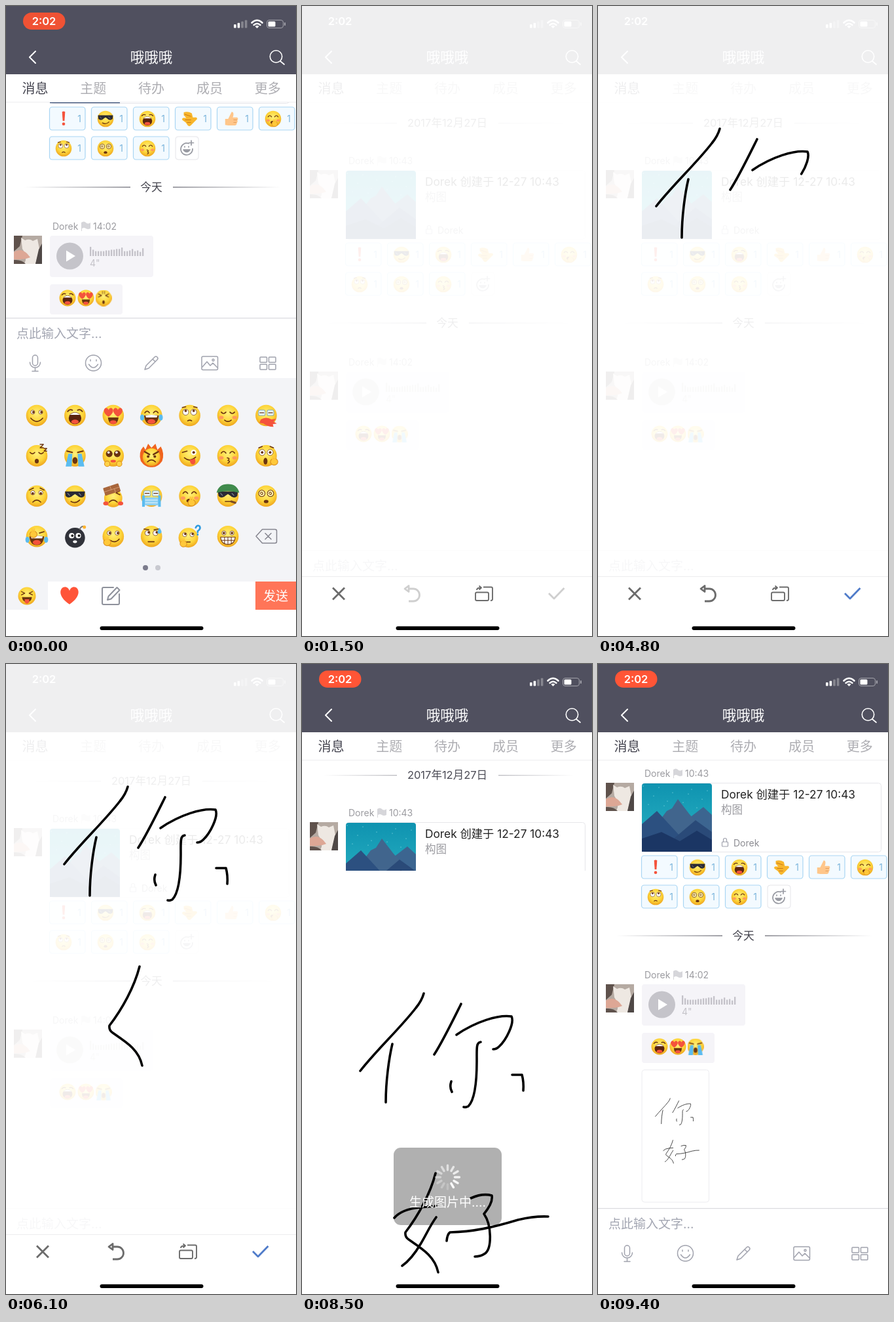
Recreate the animation shown at these times as an HTML page. Size 443 px wide and 960 px high, loop 9.5 s.

```html
<!DOCTYPE html>
<html lang="zh-CN">
<head>
<meta charset="utf-8">
<title>手写消息</title>
<style>
html, body { margin: 0; width: 100%; height: 100%; overflow: hidden; background: #fff; }
svg { display: block; width: 100vw; height: 100vh; }
text { font-family: Inter, "Noto Sans CJK SC", "Noto Sans CJK", sans-serif; white-space: pre; }
.icon { fill: none; stroke: #a0a2ad; stroke-width: 1.5; stroke-linecap: round; stroke-linejoin: round; }
.tool { fill: none; stroke: #6c6c6c; stroke-width: 2.8; stroke-linejoin: round; }
.ink { fill: none; stroke: #000; stroke-width: 3.6; stroke-linecap: round; stroke-linejoin: round; }
.ink path { stroke-dasharray: 1 2; }
.thumb { fill: none; stroke: #333; stroke-width: 3.8; stroke-linecap: round; stroke-linejoin: round; }
#spin { transform-origin: 222.5px 467px; animation: spin 1s steps(12) infinite; }
@keyframes spin { to { transform: rotate(360deg); } }
</style>
</head>
<body>
<svg id="stage" viewBox="0 0 443 960" preserveAspectRatio="none"></svg>
<script>
const LOOP = 9500, NAME = 'Dorek';
const BROWN = '#6b3410', RED = '#f4533c', BLUE = '#5bbcf0';

// shape helpers
const text = (x, y, size, fill, str, anchor = 'start', weight = 400) =>
  `<text x="${x}" y="${y + size * .37}" font-size="${size}" fill="${fill}" text-anchor="${anchor}" font-weight="${weight}">${str}</text>`;
const rect = (x, y, w, h, fill, r = 0, extra = '') =>
  `<rect x="${x}" y="${y}" width="${w}" height="${h}" rx="${r}" fill="${fill}" ${extra}/>`;
const oval = (x, y, rx, ry, fill, extra = '') =>
  `<ellipse cx="${x}" cy="${y}" rx="${rx}" ry="${ry}" fill="${fill}" ${extra}/>`;
const dot = (x, y, r, fill, extra) => oval(x, y, r, r, fill, extra);
const fill = (d, color) => `<path d="${d}" fill="${color}"/>`;
const line = (d, w = 1.6, color = BROWN) =>
  `<path d="${d}" fill="none" stroke="${color}" stroke-width="${w}" stroke-linecap="round" stroke-linejoin="round"/>`;
const at = (x, y, k, body) => `<g transform="translate(${x} ${y}) scale(${k})">${body}</g>`;
const pair = f => f(-1) + f(1);

// emoji parts, drawn around a face of radius 16
const heartPath = 'M0 6C-9 0 -6 -6 -2.6 -5.5Q-.6 -5 0 -3Q.6 -5 2.6 -5.5C6 -6 9 0 0 6Z';
const face = dot(0, 0, 16, 'url(#skin)');
const eyes = (dx = 0, dy = 0, r = 3.8) => pair(s => dot(s * 6, -5, r, '#fff', `stroke="${BROWN}" stroke-width=".7"`) + dot(s * 6 + dx, -5 + dy, 1.9, BROWN));
const arcs = line('M-10 -4Q-6.5 -9 -3 -4M3 -4Q6.5 -9 10 -4');
const shut = line('M-10 -5Q-6.5 -1 -3 -5M3 -5Q6.5 -1 10 -5');
const squint = line('M-10 -8L-4 -5L-10 -2M10 -8L4 -5L10 -2');
const bigMouth = fill('M-11 0Q0 -2 11 0Q10 13 0 13Q-10 13 -11 0', BROWN) + oval(0, 9, 6, 3.5, RED) + fill('M-9 0Q0 -2 9 0L8 3H-8Z', '#fff');
const roundMouth = oval(0, 4, 9.5, 9, '#5a2410') + oval(0, 9.3, 5.5, 3.2, RED) + fill('M-8 -1Q0 -8 8 -1Z', '#fff');
const blush = pair(s => oval(s * 10, 3, 3.5, 2.5, '#ff9a5a'));
const frown = line('M-6 9Q0 3 6 9');
const shades = fill('M-15 -7H15L14 0Q9 5 3 -1L0 -3L-3 -1Q-9 5 -14 0Z', '#2a2a34') + line('M-11 -4l3 3M6 -4l3 3', 1, '#8890a0');
const palm = (x, y) => oval(x, y, 5.5, 5, '#ffc83a', 'stroke="#d98a1c"') + line(`M${x - 2} ${y - 4}v-4M${x + 1} ${y - 4}v-4`, 2.4, '#ffc83a');
const rings = pair(s => dot(s * 6.5, -4, 4.8, '#fff3b0', `stroke="${BROWN}"`) + line(`M${s * 6.5 - 2.5} -4q2.5 -4 4 0q-1 3 -3 1`, 1));
const tears = pair(s => fill(`M${s * 10} -3L${s * 4} -3L${s * 5} 16H${s * 14}Z`, BLUE));
const specs = pair(s => rect(s * 6.5 - 5, -8, 10, 8, '#e8f6ff', 2, 'stroke="#8aa" stroke-width="1"') + line(`M${s * 6.5 - 3} -4h6`, 1.2));

const emoji = {
  smile: face + eyes(1, 0, 3) + line('M-9 4Q0 14 9 4'),
  laugh: face + line('M-11 -6Q-8 -10 -4 -8M11 -6Q8 -10 4 -8', 1.8) + roundMouth,
  love: face + pair(s => at(s * 7, -5, 1.15, fill(heartPath, RED))) + fill('M-8 3H8Q7 13 0 13Q-7 13 -8 3', BROWN) + oval(0, 10, 5, 3, RED),
  joy: face + arcs + bigMouth + pair(s => oval(s * 14, 3, 3, 4.5, BLUE)),
  roll: face + eyes(0, -2, 4.5) + line('M-11 -12l5 -1M6 -13l5 1') + line('M-3 8Q0 6 3 8'),
  shy: face + shut + blush + line('M-5 7Q0 11 5 7'),
  palmRed: face + specs + fill('M-8 6Q0 1 8 6L15 5L11 9L16 12L10 13L11 17Q2 17 -4 12L-10 11Z', RED),
  sleep: face + shut + oval(0, 8, 3, 3.5, BROWN) + line('M5 -17h5l-5 5h5M11 -11h4l-4 4h4', 1.4),
  sob: face + tears + line('M-12 -7L-4 -5M12 -7L4 -5', 2) + oval(0, 7, 3.8, 5, BROWN),
  huff: face + squint + line('M-2 -13v5M2 -13v5', 1) + oval(0, 8, 2.5, 3.5, BROWN),
  plead: face + pair(s => dot(s * 6, -3, 5, BROWN) + dot(s * 6 - 1, -5, 1.8, '#fff')) + oval(0, 8, 4, 2, RED) + pair(s => oval(s * 9, 12, 4, 4, '#ffd24a', 'stroke="#d98a1c"')),
  rage: fill('M-16 8Q-20 -6 -12 -14L-9 -9L-5 -18L0 -12L6 -18L9 -9L14 -14Q20 -4 16 8Q9 18 0 17Q-9 18 -16 8', '#f0641e') + at(0, 2, .82, face) + line('M-10 -6L-3 -2M10 -6L3 -2', 2.4) + dot(-5, 1, 2, BROWN) + dot(5, 1, 2, BROWN) + frown,
  wink: face + line('M-11 -5l7 -2') + dot(6, -5, 4, '#fff') + dot(6, -5, 2, BROWN) + line('M-8 3Q0 10 9 2') + fill('M0 6L8 4Q10 13 5 13Q1 13 0 6', RED),
  kiss: face + arcs + line('M-1 3q5 1 1 4q5 1 0 4') + blush,
  shock: face + eyes(0, 0, 4.5) + line('M-11 -12l5 -2M6 -14l5 2') + oval(-1, 8, 3, 5, BROWN) + palm(12, 9),
  sad: face + eyes(0, 1, 3.2) + line('M-11 -9l6 -3M11 -9l-6 -3') + frown,
  cool: face + shades + line('M-6 8Q1 12 7 6'),
  brick: at(0, 3, .85, face) + squint + frown + `<g transform="rotate(-18)">${rect(-11, -16, 24, 12, '#a8663c', 1)}${line('M-11 -10h24M0 -16v6M5 -10v6', .8, '#d8a078')}</g>` + pair(s => oval(s * 11, 11, 4, 3, RED)),
  mask: face + specs + rect(-11, 2, 22, 12, '#8fd0f2', 3) + line('M-9 6H9M-9 10H9', .8, '#fff') + pair(s => rect(s * 12 - 2, -1, 4, 17, BLUE)),
  giggle: face + arcs + blush + oval(0, 7, 5, 3, BROWN) + palm(3, 10),
  army: face + shades + fill('M-17 -5Q-14 -18 0 -18Q14 -18 17 -5Q0 -10 -17 -5', '#3f8a4c') + line('M-4 8H5') + line('M5 8l6 2', 3, '#7a4a24'),
  dizzy: face + rings + oval(0, 8, 3.5, 2.5, BROWN),
  facepalm: face + line('M4 -5l7 -2') + bigMouth + palm(-5, -3) + pair(s => oval(s * 14, 5, 3, 4.5, BLUE)),
  bomb: dot(0, 2, 15, '#30323a') + pair(s => dot(s * 5, -1, 4, '#fff') + dot(s * 5 + 1, -1, 1.8, '#111')) + oval(0, 8, 3, 2, '#fff') + line('M7 -11q4 -6 7 -3', 2, '#777') + dot(14, -14, 2.5, '#ffb32e'),
  chin: face + eyes(1, 0, 3.2) + line('M-4 6Q3 11 9 4') + palm(-9, 9),
  sweat: face + eyes(2, -1) + line('M-11 -11l7 1M4 -10l7 -1') + line('M-5 8h9') + fill('M12 -13q6 8 0 9q-6 -1 0 -9', BLUE),
  think: at(-2, 2, .92, face + eyes(1, -1, 3.4) + line('M-4 7h7') + palm(-8, 10)) + line('M9 -13q2 -5 6 -2q2 4 -3 7v2M12 -3v.5', 2.6, '#2f9be0'),
  grin: face + eyes(0, 0, 3.2) + fill('M-11 1H11Q10 12 0 12Q-10 12 -11 1', '#fff') + line('M-11 1H11Q10 12 0 12Q-10 12 -11 1ZM-10 6H10M-5 1v10M0 1v11M5 1v10', 1),
  tongue: face + squint + fill('M-9 2H9Q8 11 0 11Q-8 11 -9 2', BROWN) + fill('M-4 6H4V11Q0 17 -4 11Z', RED),
  bang: fill('M-3 -14Q0 -16 3 -14L1.8 4H-1.8Z', RED) + dot(0, 10, 3, RED),
  down: fill('M-11 -13Q-3 -16 5 -11L7 -3H14Q17 0 14 2L3 13Q0 16 -3 13L-7 7L-13 3Q-16 0 -12 -2H-6L-11 -7Z', '#f8b62c') + line('M-9 -9L3 -5M-8 2H3M-4 7H3', 1.3, '#c9791a'),
  thumb: fill('M-12 0H-6L1 -14Q6 -14 4 -5L3 -3H12Q15 0 12 3Q14 6 11 8Q12 11 8 13H-6L-12 12Z', '#ffc68a') + line('M5 2h6M5 7h5', 1, '#d98f4c')
};
const em = (name, x, y, r) => at(x, y, r / 16, emoji[name]);

// handwriting: path, start ms, end ms
const strokes = [
  ['M186 187Q183 198 174 209C150 240 115 272 89 305', 3560, 3810],
  ['M138 264C133 285 128 320 128 353', 3920, 4120],
  ['M243 203C232 225 215 260 202 280', 4250, 4450],
  ['M236 250C265 230 300 219 320 222C325 232 312 258 301 268Q297 272 292 272', 4560, 4850],
  ['M273 261C266 262 267 270 267 290C267 325 263 350 254 359Q250 361 247 360', 4920, 5160],
  ['M228 321Q225 330 229 337', 5220, 5300],
  ['M321 311H336Q339 322 338 335', 5380, 5490],
  ['M204 461C196 492 178 525 158 551Q157 558 163 562C185 577 203 588 208 612', 5760, 6090],
  ['M205 528C196 540 190 554 181 569C171 586 163 595 153 602', 6240, 6400],
  ['M141 529Q152 516 180 513L205 511', 6560, 6700],
  ['M258 499Q276 491 290 495Q292 506 278 523C290 540 290 575 280 583Q273 588 264 588', 6800, 7150],
  ['M221 564Q222 554 226 551C262 550 290 544 330 532Q355 526 376 527', 7230, 7490]
];

// message list, placed for scroll offset 0
const rule = (y, inset, x1, x2, color) =>
  rect(inset, y, x1 - inset, 1.2, `url(#in${color})`) + rect(x2, y, 447 - inset - x2, 1.2, `url(#out${color})`);
const avatar = y => `<svg x="12" y="${y}" width="43" height="43" viewBox="0 0 43 43">` + rect(0, 0, 43, 43, '#b5aaa2') +
  fill('M0 0H13L9 16L0 24Z', '#5f524c') + fill('M11 3L17 7Q24 4 29 8L36 5L39 20L33 43H16Q22 32 13 20Z', '#eee8e2') +
  fill('M0 25Q10 18 20 27L25 33Q14 37 0 36Z', '#dda795') + fill('M0 37Q12 36 18 43H0Z', '#5f524c') + fill('M33 43L38 21L43 12V43Z', '#4f4846');
const sender = (y, time) => text(71, y, 14, '#9b9ba0', NAME) +
  fill(`M115 ${y - 6}q4 -3 7 0t7 0v9q-4 2 -7 0t-6 0v4h-1z`, '#d6d6da') + text(133, y, 14, '#9b9ba0', time) + avatar(y + 14) + '</svg>';
const picture = `<svg x="67" y="251" width="107" height="104" viewBox="0 0 107 104">` + rect(0, 0, 107, 104, 'url(#sky)', 4) +
  Array.from({ length: 14 }, (_, i) => dot(i * 37 % 103 + 2, i * 23 % 41 + 4, .6, '#a8eef0')).join('') +
  fill('M60 62L94 36L107 48V104H60Z', '#3c6590') + fill('M20 66L38 42L46 38L55 24L72 46L96 74V104H20Z', '#41658d') +
  fill('M0 62L23 42L60 82V104H0Z', '#2c5080') + fill('M44 88L82 56L107 74V104H44Z', '#2a4a78') + fill('M0 104V84L30 74L58 88L84 72L107 86V104Z', '#1b3664') + '</svg>';
const chip = (name, i) => {
  const x = 66.5 + i % 6 * 64, y = 361 + Math.floor(i / 6) * 45;
  return rect(x, y, 54.5, 35, '#f3faff', 4, 'stroke="#a9d6f3" stroke-width="1.2"') + em(name, x + 21.5, y + 18, 12.3) + text(x + 45.5, y + 18, 14, '#7eb6dd', '1', 'middle');
};
const lock = `<g class="icon" style="stroke-width:1.2"><rect x="189.5" y="340" width="9" height="7" rx="1"/><path d="M191.5 340v-3a2.5 2.5 0 0 1 5 0v3"/></g>`;
const bars = [...'a644445566779445745385'].slice(0, 21).map((c, i) => {
  const h = 3 + parseInt(c, 16) * 1.1;
  return rect(128 + i * 4, 588 - h, 2.3, h, '#c4c2c9');
}).join('');
const plusFace = `<g class="icon" style="stroke-width:1.7;stroke:#999ba3"><path d="M279 416.5a9 9 0 1 0 6 8M283 412v7M279.5 415.5h7"/><path d="M271 426q5 7 10 0z" fill="#999ba3"/><path d="M273 421v1M279 421v1"/></g>`;

const list = '<g id="list">' +
  rule(178, 32, 145, 300, 'Soft') + text(222, 178, 16.5, '#4b4b55', '2017年12月27日', 'middle') +
  sender(236, '10:43') + rect(67.5, 250.5, 365, 105, '#fff', 4, 'stroke="#e6e6ea"') + picture +
  text(188, 268, 17.3, '#222', NAME + ' 创建于 12-27 10:43') + text(188, 291, 16.5, '#9b9ba0', '构图') +
  lock + text(207, 342, 14, '#8c8c92', NAME) +
  ['bang', 'cool', 'laugh', 'down', 'thumb', 'giggle', 'roll', 'dizzy', 'kiss'].map(chip).join('') +
  rect(259, 406, 35, 35, '#fff', 4, 'stroke="#e4e4e8"') + plusFace +
  rule(482.5, 28, 190, 255, 'Dark') + text(222, 483, 16.7, '#44444e', '今天', 'middle') +
  sender(543, '14:02') + rect(67, 557, 158, 63, '#f5f4f8', 4) + dot(97.5, 588, 20.5, '#c5c4ca') + fill('M92 579.5V596.5L106 588Z', '#fff') +
  bars + text(128, 599, 14, '#c4c3c9', '4"') +
  rect(67, 631, 111, 46, '#f5f4f8', 4) + em('laugh', 94, 652, 12.5) + em('love', 122, 652, 12.5) +
  `<g id="first">${em('huff', 149, 652, 12.5)}</g><g id="second">${em('sob', 149, 652, 12.5)}</g>` +
  '<g id="sent">' + rect(67, 687.5, 102.5, 201.5, '#fff', 4, 'stroke="#ececf0"') +
  `<g class="thumb" transform="translate(67 687.5) scale(.2325)">${strokes.map(s => `<path d="${s[0]}"/>`).join('')}</g></g></g>`;

// header and tabs
const wifi = line('M375.5 25.5Q383.5 18 391.5 25.5', 2.6, '#fff') + line('M378.5 29Q383.5 24.5 388.5 29', 2.4, '#fff') + fill('M380.5 31Q383.5 28.5 386.5 31L383.5 34Z', '#fff');
const header = rect(0, 0, 443, 104, '#50505f') + rect(26, 10, 64.5, 26, '#ff5536', 13, 'id="pill"') +
  text(58, 23, 16.5, '#fff', '2:02', 'middle', 600) +
  [0, 1, 2, 3].map(i => rect(348 + i * 5.6, 28 - i * 2.2, 3.6, 5.5 + i * 2.2, i < 2 ? '#fff' : '#86868f', 1)).join('') + wifi +
  rect(398.5, 21.5, 25, 12, 'none', 3.5, 'stroke="#a2a2aa"') + rect(400.5, 23.5, 11, 8, '#fff', 1.5) + rect(425, 25, 2, 5, '#a2a2aa', 1) +
  line('M45 69L36 78L45 87', 2, '#fff') + text(222, 78, 21.5, '#fff', '哦哦哦', 'middle') +
  dot(412.5, 77, 9.2, 'none', 'stroke="#fff" stroke-width="1.6"') + line('M419 84L425 89', 1.7, '#fff') +
  rect(0, 104, 443, 43, '#fff') + rect(0, 146, 443, 1, '#ededf0') +
  ['消息', '主题', '待办', '成员', '更多'].map((s, i) => text(44.5 + i * 88.8, 126, 20, i ? '#adadb2' : '#44444f', s, 'middle', i ? 400 : 500)).join('');

// input bar and emoji keyboard
const input = '<g id="input">' + rect(0, 829, 443, 131, '#fff') + rect(0, 829, 443, 1.2, '#dadade') +
  text(16, 853, 19, '#a3a6b2', '点此输入文字...') + '<g class="icon">' +
  '<rect x="40.5" y="886" width="8" height="16" rx="4"/><path d="M36.5 897a8 8 0 0 0 16 0M44.5 905v5M40 910.5h9"/>' +
  '<circle cx="133.5" cy="898" r="12"/><path d="M126.5 900q7 10 14 0M129 893v2M138 893v2"/>' +
  '<path d="M212 908l2 -6l13 -13q2 -2 4 0t0 4l-13 13zM224 892l4 4"/>' +
  '<rect x="299" y="888" width="24.5" height="20.5" rx="2"/><path d="M300 904l7 -8l5 6l4 -4l7 7"/><circle cx="316.5" cy="893.5" r="1.5"/>' +
  [[388, 889], [401.5, 889], [388, 900], [401.5, 900]].map(([x, y]) => `<rect x="${x}" y="${y}" width="10.5" height="8" rx="1"/>`).join('') + '</g></g>';
const keys = 'smile laugh love joy roll shy palmRed sleep sob plead rage wink kiss shock sad cool brick mask giggle army dizzy facepalm bomb chin sweat think grin'.split(' ');
const keyboard = '<g id="keyboard">' + rect(0, 567, 443, 393, '#fff') + rect(0, 567, 443, 310, '#f3f4f7') +
  keys.map((k, i) => em(k, 47 + i % 7 * 58.4, 624 + Math.floor(i / 7) * 61.4, 16.3)).join('') +
  '<path class="icon" style="stroke:#85858f" d="M382 808L391.5 797.5H411Q413.5 797.5 413.5 800V816Q413.5 818.5 411 818.5H391.5ZM396 803.5l9 9m0 -9l-9 9"/>' +
  dot(213, 856, 4, '#7b7b8c') + dot(232, 856, 4, '#c8c9d0') +
  rect(0, 877, 64, 43, '#f3f4f7') + em('tongue', 32, 899, 13.5) + at(97, 898, 2.3, fill(heartPath, '#ff5438')) +
  '<path class="icon" style="stroke:#8e919b;stroke-width:2" d="M164 886H149Q147 886 147 888V910Q147 912 149 912H171Q173 912 173 910V896M155 905l1.5 -5.5l13 -13.5l4 4l-13 13.5z"/>' +
  rect(381, 877, 62, 43, '#ff7558') + text(412, 899, 19, '#fff', '发送', 'middle') + '</g>';

// drawing sheet
const spokes = Array.from({ length: 12 }, (_, i) =>
  `<path d="M222.5 456V449" stroke="#fff" stroke-width="3.4" stroke-linecap="round" opacity="${.2 + i * .07}" transform="rotate(${i * 30} 222.5 467)"/>`).join('');
const sheet = '<g id="sheet">' + rect(0, 0, 443, 869, '#fff', 0, 'id="veil"') + rect(0, 869, 443, 91, '#fff') + rect(0, 869, 443, 1, '#ececee') +
  '<g class="tool"><path d="M47 886.5L65 904.5M65 886.5L47 904.5"/><path id="undo" d="M163 888H170A9 9 0 0 1 170 907H163M163 883.5L157 888L163 892.5Z"/>' +
  '<g style="stroke-width:1.9"><rect x="265" y="893.5" width="20" height="12.5" rx="2"/><path d="M277 885.5H289Q291 885.5 291 887.5V904Q291 906 288 906M267 890Q267 886.5 273 886.5M270.5 883.5L274 886.5L270.5 889.5"/></g>' +
  '<path id="done" d="M377 895L385 903L400.5 887"/></g>' +
  `<g class="ink">${strokes.map((s, i) => `<path id="ink${i}" pathLength="1" d="${s[0]}"/>`).join('')}</g>` +
  '<g id="hud">' + rect(140, 422, 165, 118, 'rgba(0,0,0,.31)', 11) + `<g id="spin">${spokes}</g>` + text(222.5, 505, 19, '#fff', '生成图片中....', 'middle') + '</g></g>';

const fade = (id, c1, o1, c2, o2, dir = '') =>
  `<linearGradient id="${id}" ${dir}><stop offset="0" stop-color="${c1}" stop-opacity="${o1}"/><stop offset="1" stop-color="${c2}" stop-opacity="${o2}"/></linearGradient>`;
const ruleFade = (key, c) => fade('in' + key, c, 0, c, 1) + fade('out' + key, c, 1, c, 0);
const defs = '<defs><radialGradient id="skin" cy=".4" r=".62"><stop offset="0" stop-color="#fff07a"/><stop offset=".6" stop-color="#fdd53a"/><stop offset="1" stop-color="#eda01c"/></radialGradient>' +
  ruleFade('Soft', '#b4b4ba') + ruleFade('Dark', '#62626c') + fade('sky', '#0f93b0', 1, '#2bb4c4', 1, 'x2="0" y2="1"') + '</defs>';

document.getElementById('stage').innerHTML = defs + rect(0, 0, 443, 960, '#fff') + list + header + input + keyboard + sheet + rect(143.5, 945.2, 158, 5.8, '#000', 2.9);

// timeline: [ms, declarations]; fast moves advance ten times a second
let css = '', count = 0;
const animate = (sel, steps, ease = 'step-end') => {
  const name = 'a' + count++;
  const body = [...steps, [LOOP, steps.at(-1)[1]]].map(([t, s]) => `${t / LOOP * 100}%{${s}}`).join('');
  css += `@keyframes ${name}{${body}}${sel}{animation:${name} ${LOOP}ms ${ease} infinite}`;
};
const y = v => `transform:translateY(${v}px)`;
const show = v => `opacity:${v}`;
const ticks = n => `;animation-timing-function:steps(${n})`;
const easeBoth = ';animation-timing-function:ease-in-out';

animate('#list', [[0, y(-207)], [700, y(-200)], [800, y(-185)], [900, y(-60)], [1000, y(0)], [8500, y(-9) + ticks(9)], [9400, y(-69)]]);
animate('#input', [[0, y(-354)], [200, y(-354) + easeBoth], [600, y(0)]]);
animate('#keyboard', [[0, y(0)], [200, y(0) + easeBoth], [600, y(393)]]);
animate('#pill', [[0, 'fill:#f05234;opacity:1'], [400, 'fill:#ff5536;opacity:1'], [1200, 'fill:#ff5536;opacity:0'], [8300, 'fill:#ff5536;opacity:1']]);
animate('#first', [[0, show(1)], [400, show(0)]]);
animate('#second', [[0, show(0)], [400, show(1)]]);
animate('#sent', [[0, show(0)], [8300, show(1)]]);
animate('#sheet', [[0, y(0) + ';opacity:0'], [1100, y(0) + ';opacity:.5'], [1200, y(0) + ';opacity:1'],
  ...[80, 315, 620, 820, 930, 962].map((v, i) => [8400 + i * 100, y(v) + ';opacity:1'])]);
animate('#veil', [[0, show(.91)], [8000, show(1)]]);
animate('#hud', [[0, show(0)], [8000, show(1)]]);
animate('#undo', [[0, 'stroke:#cfcfcf;fill:none'], [3820, 'stroke:#6c6c6c;fill:none']]);
animate('#done', [[0, 'stroke:#cfcfcf'], [3820, 'stroke:#4f7bc9']]);
strokes.forEach(([, from, to], i) => animate('#ink' + i, [
  [0, 'opacity:0;stroke-dashoffset:1'], [from - 1, 'opacity:0;stroke-dashoffset:1'],
  [from, 'opacity:1;stroke-dashoffset:1'], [to, 'opacity:1;stroke-dashoffset:0']], 'linear'));
document.head.appendChild(document.createElement('style')).textContent = css;
</script>
</body>
</html>
```
